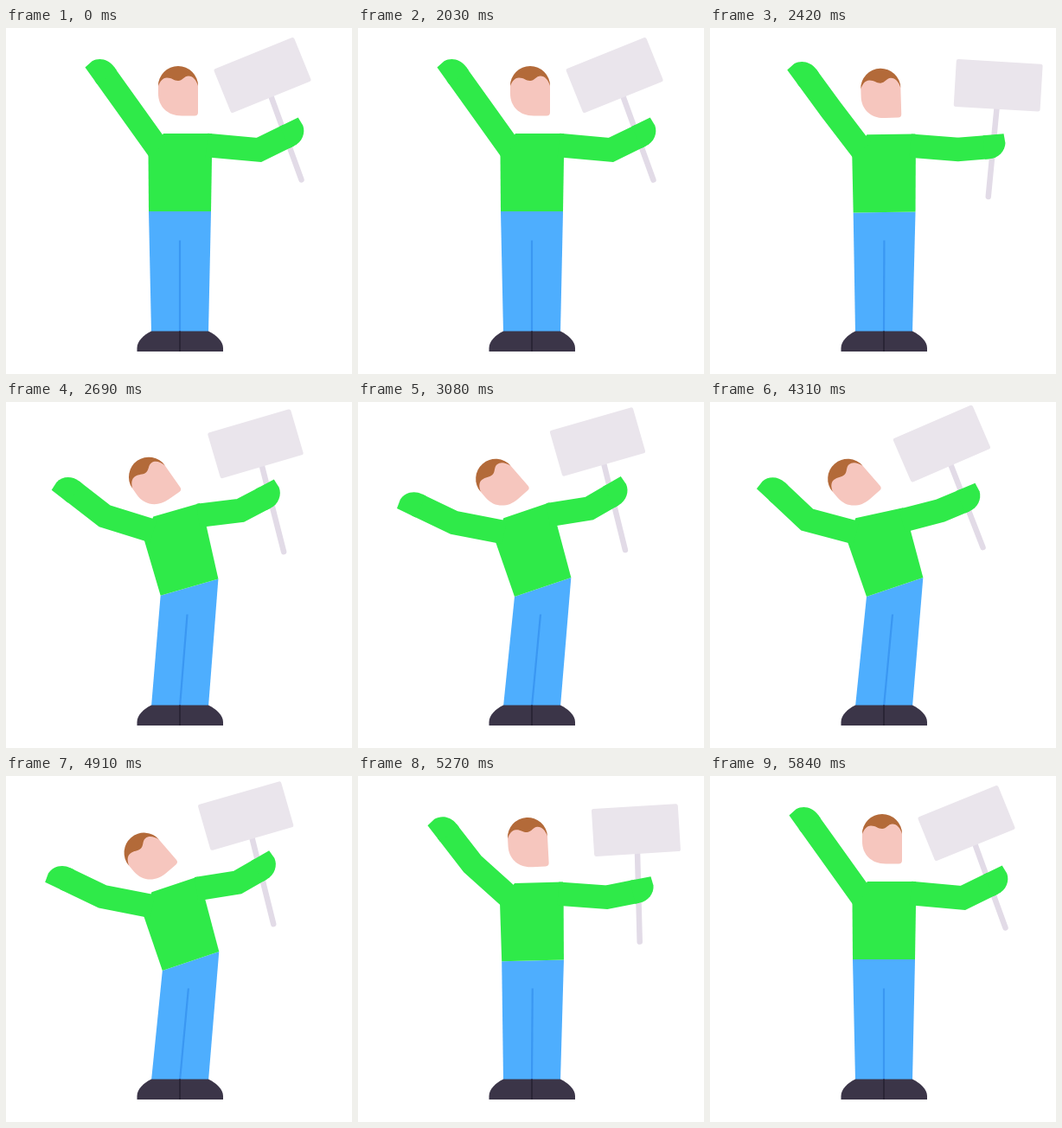
An HTML page for the animation above (5.87 s loop, 400x400 px).

```html
<!DOCTYPE html>
<html lang="en">
<head>
<meta charset="utf-8">
<title>Man waving a placard</title>
<style>
html, body { margin: 0; width: 100%; height: 100%; overflow: hidden; background: #fff; }
svg { display: block; width: 100vw; height: 100vh; }
</style>
</head>
<body>
<svg viewBox="0 0 400 400">
  <g id="sign">
    <path d="M0 24L-3.8 129" stroke="#e2dbe7" stroke-width="6.5" stroke-linecap="round"/>
    <rect x="-50" y="-27.5" width="100" height="55" rx="2.5" fill="#eae5ec"/>
  </g>
  <path id="legs" fill="#4eaefe"/>
  <path id="crease" stroke="#3a97f2" stroke-width="2.2" fill="none"/>
  <path d="M168 350.5H234C243 355 251 362 251 370V374H151.5V370C151.5 362 159 355 168 350.5Z" fill="#3b3548"/>
  <path d="M201 350.5V374" stroke="#2a2536" stroke-width="2"/>
  <g fill="#2fea49">
    <path id="torso"/>
    <path id="armL" fill="none" stroke="#2fea49" stroke-width="27.5" stroke-miterlimit="9"/>
    <path id="handL"/>
    <path id="armR" fill="none" stroke="#2fea49" stroke-width="27.5" stroke-miterlimit="9"/>
    <path id="handR"/>
  </g>
  <g id="head">
    <path d="M-23 0A23 20 0 0 1 23 0V31.5Q23 35.5 19 35.5H4C-13 35.5 -23 24 -23 10Z" fill="#f6c6be"/>
    <path d="M-23 1A23 23 0 1 1 23 1C21 -6 17 -10.5 12 -10.5C7 -10.5 5 -5 0 -5C-5 -5 -7 -8.5 -13 -8.5C-18 -8.5 -21 -4 -23 1Z" fill="#b36a39"/>
  </g>
</svg>
<script>
const LOOP = 5870, HALF = 13.75;
const WAVE_START = 3085, WAVE_PERIOD = 910, WAVES = 2;
const $ = id => document.getElementById(id);
const rad = a => a * Math.PI / 180;
const mix = (a, b, k) => a + (b - a) * k;

// Cubic ease in and out from 0 at time a to 1 at time b
function ramp(t, a, b) {
  const x = Math.min(1, Math.max(0, (t - a) / (b - a)));
  return x < 0.5 ? 4 * x ** 3 : 1 - 4 * (1 - x) ** 3;
}
const hold = (t, a, b, c, d) => ramp(t, a, b) - ramp(t, c, d);

function wave(t) {
  const turns = Math.min(WAVES, Math.max(0, (t - WAVE_START) / WAVE_PERIOD));
  return (1 - Math.cos(2 * Math.PI * turns)) / 2;
}

const move = ([x, y], a, l) => [x + l * Math.cos(rad(a)), y + l * Math.sin(rad(a))];
const line = pts => "M" + pts.map(p => p[0].toFixed(2) + " " + p[1].toFixed(2)).join("L");
const place = (id, x, y, a) => $(id).setAttribute("transform", `translate(${x} ${y}) rotate(${a})`);

function drawArm(side, shoulder, upper, len1, fore, len2) {
  const elbow = move(shoulder, upper, len1);
  const tip = move(elbow, fore, len2);
  const root = move(shoulder, upper, -6);
  $("arm" + side).setAttribute("d", line([root, elbow, move(tip, fore, -19)]));
  place("hand" + side, tip[0], tip[1], fore);
}

function draw(t) {
  const lean = hold(t, 2290, 2890, 4830, 5430);
  const lift = hold(t, 2290, 2890, 4900, 5535);
  const late = hold(t, 2290, 3050, 4830, 5430);
  const swing = hold(t, 2000, 2330, 2330, 2830) + hold(t, 4960, 5500, 5400, 5850);
  const w = wave(t), sink = lean ** 0.66;

  const tilt = rad(18.7 * lean), c = Math.cos(tilt), s = Math.sin(tilt);
  const wx = 165 + 16 * lean, wy = 212 + 13 * sink, drop = 8 * w;
  const body = (x, y) => [wx + x * c + y * s, wy - x * s + y * c];
  const waistL = body(0, 0), waistR = body(72 - 3 * lean, 0);

  $("torso").setAttribute("d", line([waistL, body(-0.5, -67), body(17, -90),
    body(73, -90 + drop), body(73, -62), waistR]) + "Z");
  $("legs").setAttribute("d", line([waistL, waistR, [234, 352], [168, 352]]) + "Z");
  $("crease").setAttribute("d", line([[201 + 10 * lean, 245.5], [201, 352]]));

  drawArm("L", body(7.5, -77), mix(234.4, 191 + 5 * w, lift), 53,
    mix(234.4, 205.5 + 22.5 * w, late), 67);
  const reach = mix(54.7, 42 - 2.4 * w, lean) - 5 * swing;
  drawArm("R", body(73, -76 + drop), mix(5.2, -9 - 7 * w, lean), reach,
    mix(-26.1, -30 + 9 * w, lean) + 22 * swing, 27 + 0.55 * reach);

  place("head", 199 - 40.5 * lean, 66 + 22 * sink, -41 * lean);
  place("sign", mix(296.5, 277 - 11.5 * w, late) + 38 * swing,
    mix(54.5, 46 + 2.7 * w, lean) + 12.5 * swing,
    mix(-22.1, -16 - 9.3 * w, late) + 26 * swing);
}

for (const id of ["handL", "handR"])
  $(id).setAttribute("d", `M-24 ${-HALF}H0L1 -3C0 6 -8 ${HALF} -19 ${HALF}H-24Z`);

const start = performance.now();
function tick(now) {
  draw(Math.max(0, now - start) % LOOP);
  requestAnimationFrame(tick);
}
draw(0);
requestAnimationFrame(tick);
</script>
</body>
</html>
```
